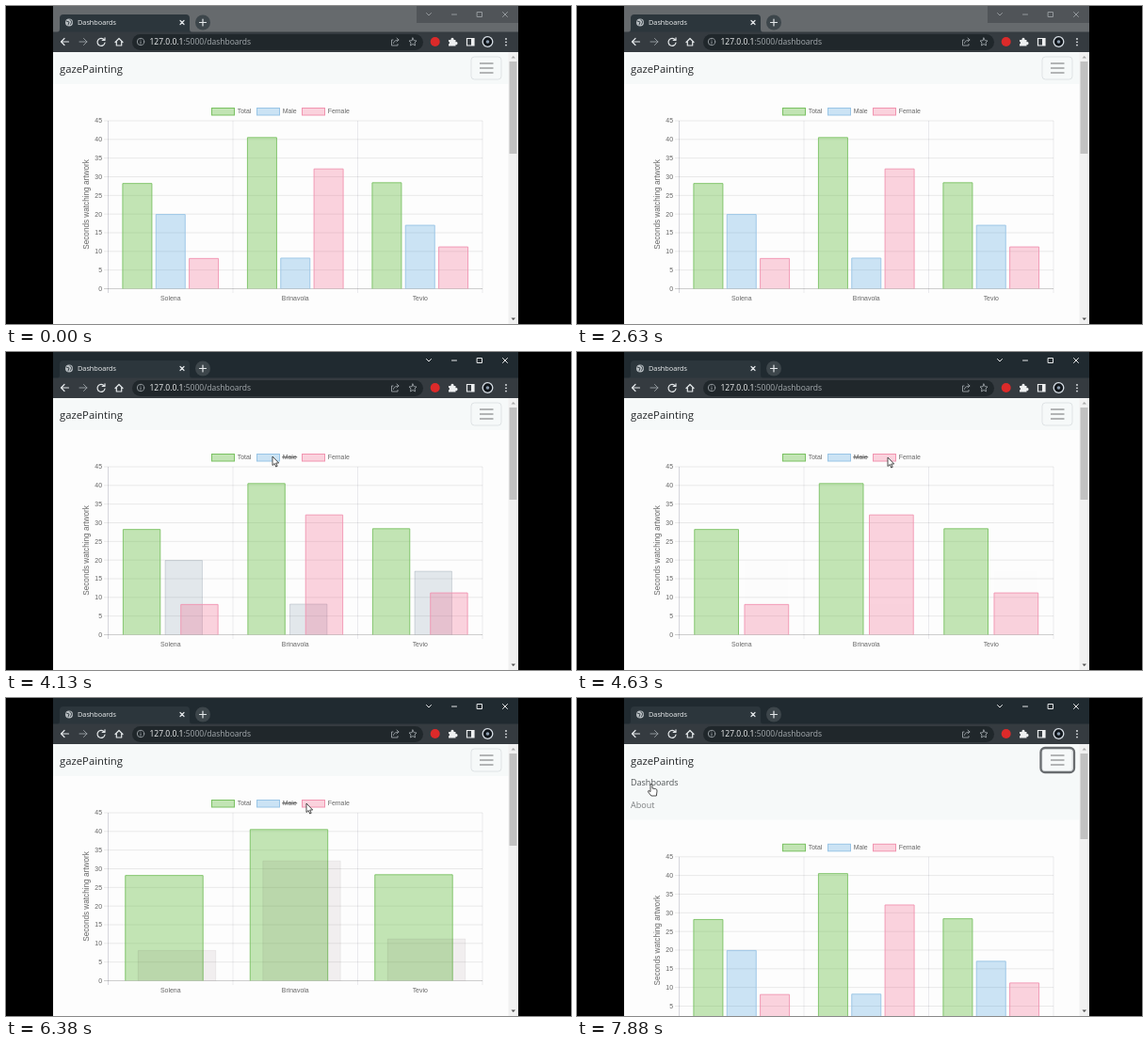
Write an HTML page that moves like this. It is 600 px wide and 338 px high and loops after 8000 ms.

```html
<!DOCTYPE html>
<html lang="en">
<head>
<meta charset="utf-8">
<title>Dashboards</title>
<style>
  html, body { margin: 0; width: 100%; height: 100%; overflow: hidden; background: #000; }
  svg { display: block; width: 100vw; height: 100vh; }
  .ui { font-family: "Open Sans", sans-serif; }
  .chart { font: 6.95px "Liberation Sans", Arial, sans-serif; fill: #666; }
  .line { fill: none; stroke-linecap: round; stroke-linejoin: round; }
</style>
</head>
<body>
<svg viewBox="0 0 600 338">
  <defs>
    <clipPath id="windowClip"><rect x="50" width="494" height="338"/></clipPath>
    <clipPath id="navClip"><rect id="navClipBox" x="50" y="49" width="484" height="34"/></clipPath>
  </defs>
  <g clip-path="url(#windowClip)">
    <rect x="50" width="494" height="338" fill="#fdfdfd"/>

    <g id="content" class="chart">
      <g id="grid"></g>
      <g id="bars"></g>
      <g id="legend"></g>
      <g id="tooltip">
        <path d="M286 159H335Q338.500 159 338.500 162.500V169.500L342 172.500L338.500 175.500V182.500Q338.500 186 335 186H286Q282.500 186 282.500 182.500V162.500Q282.500 159 286 159Z" fill="#000" fill-opacity=".8"/>
        <text x="286" y="169" fill="#fff" font-weight="bold">Brinavola</text>
        <rect x="286" y="174.500" width="7" height="7" fill="#fbd3de" stroke="#f196b2" stroke-width=".7"/>
        <text x="295" y="180.500" fill="#fff" font-size="6.600">Female: 32.2</text>
      </g>
    </g>

    <g class="ui">
      <rect id="nav" x="50" y="49" width="484" height="34" fill="#f6f9f9"/>
      <text x="57" y="71" font-size="11.300" fill="#222527">gazePainting</text>
      <g clip-path="url(#navClip)" font-size="9">
        <text id="link" x="57" y="93.300">Dashboards</text>
        <text x="57" y="116.800" fill="#7c7f80">About</text>
      </g>
      <rect x="494" y="54" width="32" height="24" rx="3.500" fill="none" stroke="#dfe3e5"/>
      <rect id="ring" x="492.500" y="53" width="35.500" height="26" rx="4.500" fill="none" stroke="#686c6f" stroke-width="2.300"/>
      <path d="M503 61H517.500M503 66H517.500M503 71H517.500" stroke="#707375" stroke-width="1.200"/>
    </g>

    <rect x="533.500" y="49" width="10.500" height="289" fill="#f1f1f1"/>
    <rect id="thumb" x="534.500" y="59" width="8" height="98" fill="#c1c1c1"/>
    <path d="M536.500 55.500L538.700 53L541 55.500Z" fill="#aaa"/>
    <path d="M536.500 331.500L538.700 334L541 331.500Z" fill="#505050"/>

    <rect id="titleBar" x="50" width="494" height="28"/>
    <rect id="controlBack" x="436" width="108" height="18" fill="#505458"/>
    <path d="M54 28Q57 28 57 24V13Q57 9 61 9H191Q195 9 195 13V24Q195 28 198 28Z" fill="#2c363c"/>
    <rect x="50" y="27.500" width="494" height="21.500" fill="#353b40"/>
    <rect x="134" y="30" width="309" height="17" rx="8.500" fill="#20272b"/>
    <g class="ui" fill="#f0f2f3">
      <text x="76" y="20.300" font-size="7.300">Dashboards</text>
      <text x="152.500" y="41.300" font-size="8.500">127.0.0.1<tspan fill="#a5abaf">:5000/dashboards</tspan></text>
    </g>
    <circle cx="67" cy="17.500" r="4" fill="#b6bcc0"/>
    <path class="line" d="M64 16L67 17L66 20M68 14.500L70 17L68.500 19.500" stroke="#3b464c"/>
    <circle cx="209" cy="17.500" r="8" fill="#3d464b"/>
    <g class="line" stroke="#e3e7e9" stroke-width="1.200">
      <path d="M185 15.500L189 19.500M189 15.500L185 19.500M205.500 17.500H212.500M209 14V21"/>
      <path d="M66.500 38H58.500M62 34.500L58.500 38L62 41.500"/>
      <path d="M104.300 36A4 4 0 1 0 105 39M105 33.800V36.500H102.200"/>
      <path d="M116 38.500L120 34.500L124 38.500M117.300 38V42H122.700V38"/>
    </g>
    <g class="line" stroke="#9ba2a6" stroke-width=".9">
      <path d="M78 38H86M82.500 34.500L86 38L82.500 41.500"/>
      <circle cx="143" cy="38" r="3.700"/>
      <path d="M143 37.800V40M143 36V36.100"/>
      <path d="M411 36H409.500V42H416V40.500M411.500 39.500Q412 36 417 36M415 34L417 36L415 38"/>
      <path d="M432 34L433.200 36.700L436 37L434 39L434.500 42L432 40.500L429.500 42L430 39L428 37L430.800 36.700Z"/>
    </g>
    <circle cx="455.700" cy="38" r="5" fill="#dc2a2a"/>
    <path d="M470 36H472.500A1.600 1.600 0 1 1 475.500 36H477.500V38.200A1.500 1.500 0 1 1 477.500 41V42.500H470V40.500A1.400 1.400 0 0 0 470 37.800Z" fill="#eef0f1"/>
    <path d="M489.500 34.500H497V42H489.500Z" fill="none" stroke="#eef0f1" stroke-width="1.200"/>
    <path d="M494 34.500H497V42H494Z" fill="#eef0f1"/>
    <circle cx="511.500" cy="38" r="5.300" fill="#11161b" stroke="#d7dee5" stroke-width="1.300"/>
    <circle cx="511.500" cy="38" r="1.800" fill="#8c9cae"/>
    <g fill="#e6e9eb"><circle cx="531" cy="35" r=".9"/><circle cx="531" cy="38.300" r=".9"/><circle cx="531" cy="41.600" r=".9"/></g>
    <path id="controls" class="line" d="M446.500 7.500L449 10L451.500 7.500M473.500 9H478.500M500.500 6.500H505.500V11.500H500.500ZM527.500 6.500L532.500 11.500M532.500 6.500L527.500 11.500"/>

    <g id="cursor" stroke="#222" stroke-width=".8" fill="#fff" stroke-linejoin="round">
      <path id="arrow" d="M0 0V9.500L2.200 7.500L3.700 11L5.200 10.300L3.700 7H6.700Z"/>
      <path id="hand" d="M-1 1Q0 -.8 1 1V5L4.500 5.600Q6.300 6 6 8L5.300 13H-.2L-3.500 8.800Q-3.700 7 -2 7.800L-1 8.600Z"/>
    </g>
  </g>
</svg>
<script>
const LOOP = 8000, ACTIVATE = 3960, OPEN_MENU = 7200;
const LEFT = 108.5, STEP = 132.5, BASE = 300.5, UNIT = 178.5 / 45;
const categories = ['Solena', 'Brinavola', 'Tevio'];
const sets = [
  { name: 'Total', values: [28.3, 40.6, 28.5], fill: [106, 190, 70, .4], border: [122, 193, 98], x: 218.5 },
  { name: 'Male', values: [20, 8.3, 17.1], fill: [54, 146, 215, .25], border: [153, 197, 230], x: 266.5 },
  { name: 'Female', values: [8.2, 32.2, 11.3], fill: [240, 80, 125, .25], border: [241, 148, 176], x: 314.5 }
];
const toggles = [[ACTIVATE, 1], [5440, 2], [6310, 2], [6640, 1]];
// time, x, y
const route = [
  [3960, 283, 111], [4250, 283, 111], [4600, 330, 112], [5600, 330, 112], [6150, 319, 112],
  [6400, 319, 112], [6580, 283, 111], [6690, 283, 111], [6980, 505, 72], [7300, 507, 70], [7800, 79, 91]
];

const $ = id => document.getElementById(id);
const set = (id, attrs) => { for (const k in attrs) $(id).setAttribute(k, attrs[k]); };
const show = (id, on) => $(id).style.display = on ? '' : 'none';
const clamp = v => Math.min(1, Math.max(0, v));
const lerp = (a, b, p) => a + (b - a) * p;
const outQuart = u => 1 - (1 - clamp(u)) ** 4;
const smooth = u => { u = clamp(u); return u * u * (3 - 2 * u); };
const rgba = (c, a = 1) => `rgba(${c[0]},${c[1]},${c[2]},${c[3] ?? a})`;

function buildGrid() {
  let out = '';
  for (let v = 0; v <= 45; v += 5) {
    const y = BASE - v * UNIT;
    out += `<path d="M104 ${y}H506" stroke="#000" stroke-opacity="${v ? .12 : .28}" stroke-width=".7"/>
      <text x="102" y="${y + 2.4}" text-anchor="end">${v}</text>`;
  }
  for (let i = 0; i < 4; i++)
    out += `<path d="M${LEFT + i * STEP} 122V305" stroke="#224" stroke-opacity="${i ? .12 : .25}" stroke-width=".7"/>`;
  categories.forEach((name, i) => {
    out += `<text x="${LEFT + (i + .5) * STEP}" y="313.3" text-anchor="middle">${name}</text>`;
  });
  return out + '<text transform="translate(88 211) rotate(-90)" text-anchor="middle" font-size="8.2">Seconds watching artwork</text>';
}

const buildLegend = () => sets.map((s, i) =>
  `<rect x="${s.x}" y="108.500" width="24" height="7.500" fill="${rgba(s.fill)}" stroke="${rgba(s.border)}"/>
   <text x="${s.x + 27.2}" y="114.300">${s.name}</text>
   <path id="strike${i}" d="M${s.x + 26.7} 111.800h${[16, 16, 24][i]}" stroke="#555"/>`).join('');

function layout(visible) {
  const shown = visible.filter(Boolean).length, size = STEP * .8 / shown;
  return sets.map((s, i) => {
    const slot = visible[i] ? visible.slice(0, i).filter(Boolean).length : shown - 1;
    return { offset: (slot - (shown - 1) / 2) * size, width: size * .9, alpha: +visible[i] };
  });
}

function chartAt(t) {
  let visible = [true, true, true], from = layout(visible), to = from, began = 0;
  const stateAt = time => to.map((goal, i) => {
    const p = outQuart((time - began) / 1000), state = {};
    for (const k in goal) state[k] = lerp(from[i][k], goal[k], p);
    return state;
  });
  for (const [time, index] of toggles) {
    if (time > t) break;
    const now = stateAt(time), before = visible;
    visible = visible.map((v, i) => i === index ? !v : v);
    to = layout(visible);
    // series that stay hidden take their new slot at once
    from = now.map((s, i) => before[i] || visible[i] ? s : to[i]);
    began = time;
  }
  return { visible, states: stateAt(t) };
}

function drawBars(states) {
  $('bars').innerHTML = states.map(({ offset, width, alpha }, i) => {
    if (alpha < .004) return '';
    const s = sets[i], fill = s.fill.map(c => c * alpha), stroke = s.border.map(c => c * alpha);
    return s.values.map((v, c) => {
      const x = LEFT + (c + .5) * STEP + offset - width / 2;
      return `<path d="M${x + .4} ${BASE}V${BASE - v * UNIT + .4}h${width - .8}V${BASE}" fill="${rgba(fill)}"
        stroke="${rgba(stroke, alpha * alpha)}" stroke-width=".9"/>`;
    }).join('');
  }).join('');
}

function drawCursor(t) {
  show('cursor', t >= ACTIVATE);
  const next = route.findIndex(p => p[0] > t);
  const b = next < 0 ? route[route.length - 1] : route[next], a = route[Math.max(0, next - 1)];
  const p = next > 0 ? smooth((t - a[0]) / (b[0] - a[0])) : 1;
  const x = lerp(a[1], b[1], p), y = lerp(a[2], b[2], p);
  const onLink = t > OPEN_MENU && x < 107 && y > 82;
  const pointing = onLink || (x > 493 && y < 79);
  set('cursor', { transform: `translate(${x} ${y})` });
  show('arrow', !pointing);
  show('hand', pointing);
  set('link', { fill: onLink ? '#515557' : '#7c7f80' });
}

function render(t) {
  const active = t >= ACTIVATE, { visible, states } = chartAt(t);
  drawBars(states);
  sets.forEach((s, i) => show('strike' + i, !visible[i]));
  set('tooltip', { opacity: Math.min(clamp((t - 2880) / 200), clamp((3396 - t) / 200)) });

  set('titleBar', { fill: active ? '#202a30' : '#666a6d' });
  show('controlBack', !active);
  set('controls', { stroke: active ? '#e8eaec' : '#94999d' });

  const open = smooth((t - OPEN_MENU) / 350);
  set('nav', { height: 34 + 46.5 * open });
  set('navClipBox', { height: 34 + 46.5 * open });
  set('content', { transform: `translate(0 ${46.8 * open})` });
  set('thumb', { height: 98 - 7 * open });
  show('ring', t >= OPEN_MENU);
  drawCursor(t);
}

$('grid').innerHTML = buildGrid();
$('legend').innerHTML = buildLegend();
const start = performance.now();
function tick() {
  render((performance.now() - start) % LOOP);
  requestAnimationFrame(tick);
}
tick();
</script>
</body>
</html>
```
